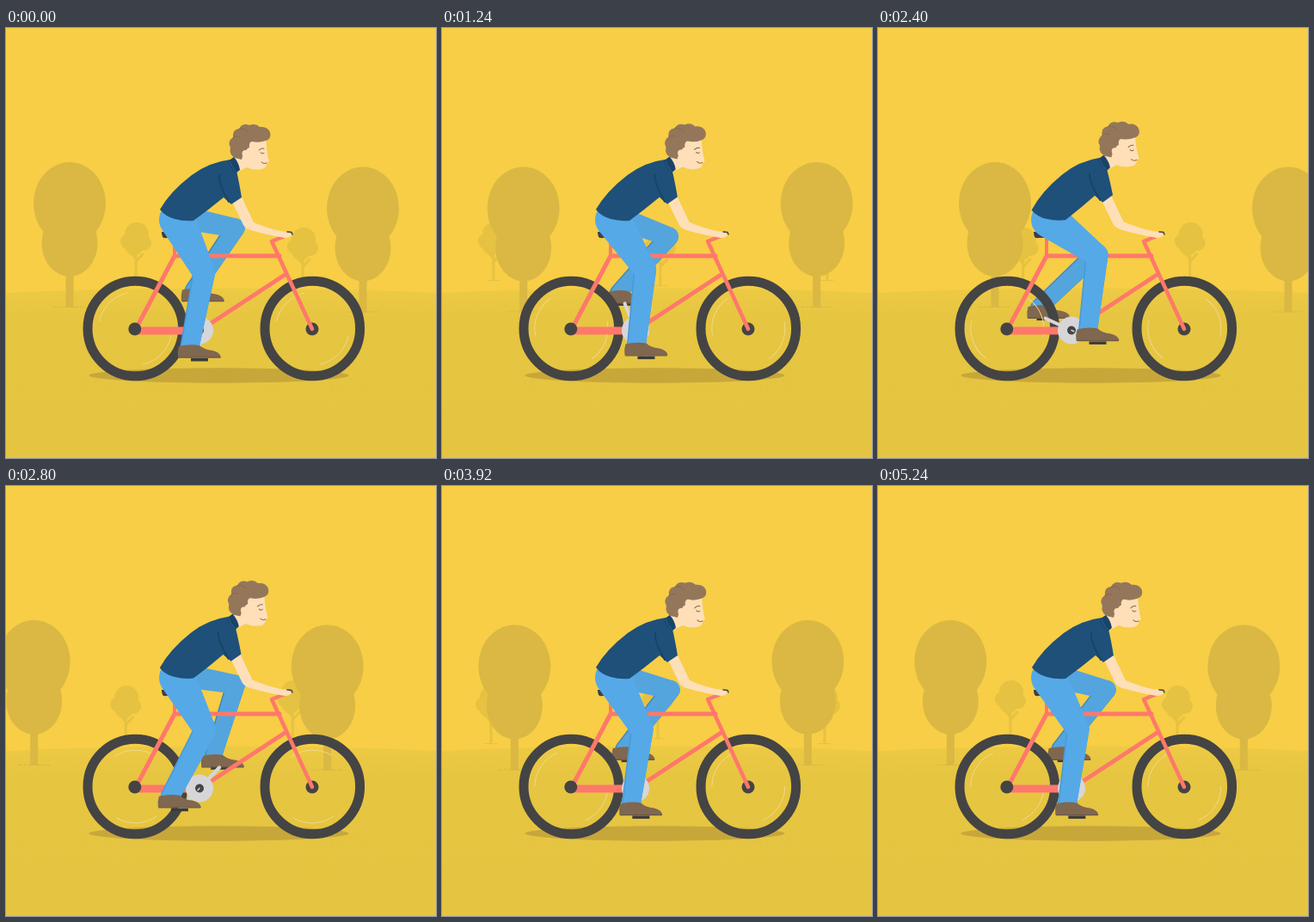
An HTML page with a canvas that plays this animation: 500x500 px, repeating every 5280 ms.

```html
<!DOCTYPE html>
<html lang="en">
<head>
<meta charset="utf-8">
<title>Cyclist</title>
<style>
  html, body { margin: 0; height: 100%; overflow: hidden; background: #f7ce45; }
  canvas { display: block; width: 100vw; height: 100vh; }
</style>
</head>
<body>
<canvas></canvas>
<script>
const canvas = document.querySelector('canvas');
const scale = Math.max(1, window.devicePixelRatio || 1);
canvas.width = canvas.height = 500 * scale;
const ctx = canvas.getContext('2d');
ctx.scale(scale, scale);
ctx.lineCap = ctx.lineJoin = 'round';

const TAU = Math.PI * 2, STEP = 40, FRAMES = 132, TURN = 33;
const DARK = '#444444', PINK = '#ff786b', STEEL = '#d6d6d9', SKIN = '#fedfb8',
  SHOE = '#80674f', HAIR = '#94775b', SHIRT = '#1f507a', SHIRT_SHADE = '#194468',
  BIG_TREE = '#dab843', SMALL_TREE = '#e6c242';
const CRANK = [225, 351.5], HUBS = [[150.3, 349.5], [356.3, 349.5]];
const THIGH = 69, SHIN = 88, REACH = 33.5;
const NEAR = { hip: [199, 223], radii: [21, 13, 11], color: '#55a9e7', shade: '#489ad9' };
const FAR = { hip: [199, 219], radii: [14, 11, 10], color: '#54a5de', shade: '#3f88bd' };

function fill(d, color) {
  ctx.fillStyle = color;
  ctx.fill(new Path2D(d));
}

function line(d, color, width) {
  ctx.strokeStyle = color;
  ctx.lineWidth = width;
  ctx.stroke(new Path2D(d));
}

function oval(x, y, rx, ry, color) {
  ctx.fillStyle = color;
  ctx.beginPath();
  ctx.ellipse(x, y, rx, ry, 0, 0, TAU);
  ctx.fill();
}

const disc = (x, y, r, color) => oval(x, y, r, r, color);

function at(x, y, angle, draw) {
  ctx.save();
  ctx.translate(x, y);
  ctx.rotate(angle);
  draw();
  ctx.restore();
}

// Two circles joined by their outer tangents
function limb([x1, y1], r1, [x2, y2], r2, color) {
  const dir = Math.atan2(y2 - y1, x2 - x1);
  const lean = Math.acos((r1 - r2) / Math.hypot(x2 - x1, y2 - y1));
  ctx.fillStyle = color;
  ctx.beginPath();
  ctx.arc(x1, y1, r1, dir + lean, dir - lean + TAU);
  ctx.arc(x2, y2, r2, dir - lean, dir + lean);
  ctx.fill();
}

function scenery() {
  ctx.fillStyle = '#f7ce45';
  ctx.fillRect(0, 0, 500, 500);
  const ground = ctx.createLinearGradient(0, 302, 0, 500);
  ground.addColorStop(0, '#edca44');
  ground.addColorStop(0.18, '#e6c541');
  ground.addColorStop(1, '#e5c441');
  fill('M0 308Q250 297 500 308V500H0Z', ground);
}

function smallTree(x, drop) {
  at(x, drop, 0, () => {
    line('M0 250V293M0 272L8 263M0 268L-7 260', SMALL_TREE, 3);
    disc(1, 240, 14, SMALL_TREE);
    disc(-9, 248, 9, SMALL_TREE);
    disc(9, 250, 9, SMALL_TREE);
    disc(-2, 253, 11, SMALL_TREE);
    line('M-7 293.5H7', SMALL_TREE, 1);
  });
}

function bigTree(x, drop) {
  at(x, drop, 0, () => {
    oval(0, 204, 42, 48, BIG_TREE);
    oval(0, 250, 32.5, 39, BIG_TREE);
    ctx.fillRect(-4.5, 280, 9, 45);
    line('M-18 324.5h4M-11 323v2M-8 324.5H10M13 323v2M15 324.5h3', BIG_TREE, 1);
  });
}

function row(frame, first, spacing, speed, tree, drop) {
  const cycle = spacing * 2;
  for (let i = 0; i < 2; i++) {
    const x = first + i * spacing - frame * speed;
    const start = ((x + 60) % cycle + cycle) % cycle - 60;
    for (let p = start; p < 560; p += cycle) tree(p, i * drop);
  }
}

function leg([px, py], { hip, radii: [hipR, kneeR, ankleR], color, shade }) {
  const ankle = [px - 11.5, py - 14];
  const dx = ankle[0] - hip[0], dy = ankle[1] - hip[1], d = Math.hypot(dx, dy);
  const bend = Math.acos((THIGH ** 2 + d * d - SHIN ** 2) / (2 * THIGH * d));
  const angle = Math.atan2(dy, dx) - bend;
  const knee = [hip[0] + THIGH * Math.cos(angle), hip[1] + THIGH * Math.sin(angle)];
  limb(knee, kneeR, ankle, ankleR, shade);
  limb([knee[0] + 0.8, knee[1]], kneeR - 0.8, [ankle[0] + 0.8, ankle[1]], ankleR - 0.8, color);
  limb(hip, hipR, knee, kneeR, color);
  at(px, py, 0, () => {
    fill('M-24-15Q-12-18 0-16Q5-11 15-10Q24-8 25-2H-25Q-26-9-24-15Z', SHOE);
    line('M-24-1.8H24', '#6c5742', 1.2);
  });
}

function pedal([x, y]) {
  ctx.fillStyle = '#3b3b3b';
  ctx.fillRect(x - 10, y - 1, 20, 3.5);
}

const arm = ([x, y]) => line(`M${CRANK}L${x} ${y}`, STEEL, 4);

function wheel([x, y], turn) {
  ctx.strokeStyle = DARK;
  ctx.lineWidth = 11;
  ctx.beginPath();
  ctx.arc(x, y, 55.3, 0, TAU);
  ctx.stroke();
  at(x, y, turn, () => {
    ctx.strokeStyle = '#f0da8c';
    ctx.lineWidth = 0.9;
    for (const start of [0.2, 0.2 + Math.PI]) {
      ctx.beginPath();
      ctx.arc(0, 0, 42.5, start, start + 1.15);
      ctx.stroke();
    }
  });
}

function bike() {
  line('M196 243V265', PINK, 4);
  line('M152 348L196 265H318', PINK, 5);
  line('M225 352L325 286.5', PINK, 5);
  line('M154 352H212', PINK, 9);
  disc(149.8, 350, 7.5, DARK);
  disc(356, 350, 7.5, DARK);
  line('M356 350L309 248L323 242.5', PINK, 4.5);
  fill('M181 237H214Q219 239 216 244H187Q181 246 181 237Z', '#3f3f45');
}

function upperBody(sway) {
  const ex = -3 * sway, ey = -sway;
  fill(`M${260 + ex} ${196 + ey}L${276 + ex} ${229 + ey}Q${278 + ex} ${233 + ey} 284 235` +
    `Q305 241 324 244Q331 244 332 240Q329 236 321 236.5Q304 233 ${288 + ex} ${226 + ey}` +
    `L${271 + ex} ${190 + ey}Z`, SKIN);
  line('M327 237L332 237.5L333 240', DARK, 1.5);

  const [hx, hy] = NEAR.hip;
  at(hx, hy, -0.043 * sway, () => {
    ctx.translate(-hx, -hy);
    // Head
    fill('M264 150L270 126H302Q303 146 306 155Q305 157 303 157Q304 164 295 164.5' +
      'Q287 165.5 280 162L270 167Z', SKIN);
    fill('M266 151Q259 147 261 139Q257 132 264 127Q263 118 271 117Q275 110 283 113' +
      'Q290 110 295 115Q304 114 307 121Q309 129 302 131Q294 134 286 132Q282 133 283 139' +
      'Q279 140 279 145Q275 147 274 153Z', HAIR);
    line('M271 118Q278 115 281 121M264 128Q268 124 272 127', '#87694f', 1);
    disc(278.5, 146, 4, SKIN);
    line('M294 142Q297 139 300 140M296 145Q298 147 300 145.5', '#80654c', 1);
    line('M297 156Q300 159 303 157', '#a55d4b', 1);

    // Shirt
    fill('M261 153Q236 156 216 171Q191 190 179 211Q185 219 196 222Q207 225 218 224' +
      'Q236 211 253 197L262 205L274 197Q271 179 268 166Z', SHIRT);
    line('M248 171Q247 181 259 202', SHIRT_SHADE, 2);
    fill('M258 155L265 150Q271 157 272 165L267 169Q261 163 258 155Z', SHIRT_SHADE);
    line('M260 155Q262 161 267 167', '#2b628f', 1);
  });
}

function draw(frame) {
  const turn = frame / TURN * TAU;
  const dx = -REACH * Math.sin(turn), dy = REACH * Math.cos(turn);
  const near = [CRANK[0] + dx, CRANK[1] + dy];
  const far = [CRANK[0] - dx, CRANK[1] - dy];

  scenery();
  row(frame, 151, 194, 388 / FRAMES, smallTree, 6);
  row(frame, 74, 341, 341 / TURN, bigTree, 5.5);
  oval(247.5, 404, 151, 8.7, '#c8a73a');
  for (const [x, y] of [[95, 405], [105, 411], [170, 417], [200, 413], [378, 417], [402, 409]])
    disc(x, y, 0.6, '#d2b13c');

  pedal(far);
  leg([far[0] + 4, far[1] + 1.5], FAR);
  for (const hub of HUBS) wheel(hub, turn);
  bike();
  arm(far);
  disc(...CRANK, 16, STEEL);
  arm(near);
  at(...CRANK, turn, () => {
    disc(0, 0, 5, DARK);
    line('M0 0V3', STEEL, 1.5);
  });
  pedal(near);
  leg(near, NEAR);
  upperBody((1 - Math.cos(turn * 2)) / 2);
}

function tick() {
  draw(Math.floor(performance.now() / STEP) % FRAMES);
  requestAnimationFrame(tick);
}
tick();
</script>
</body>
</html>
```
